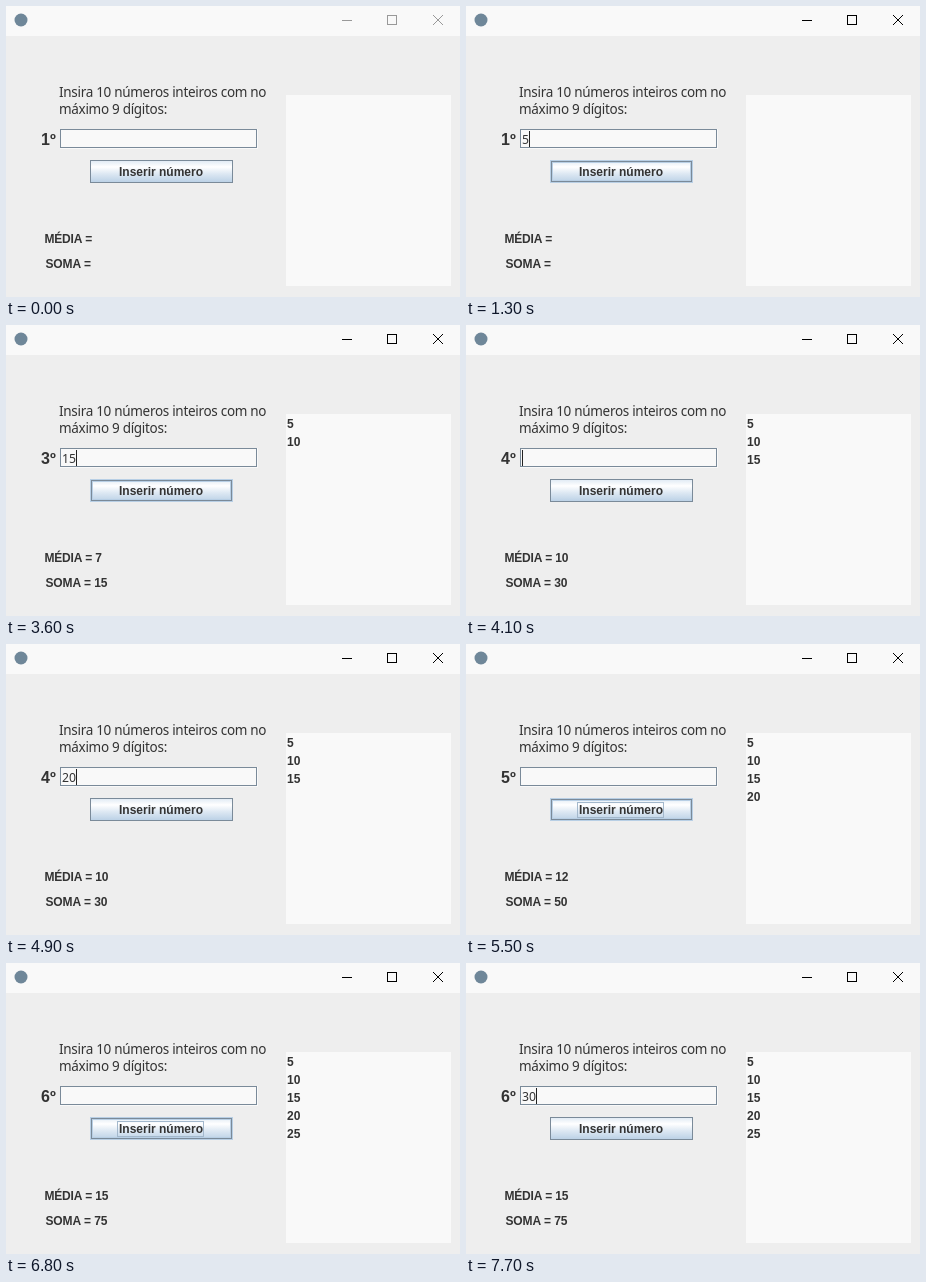
An HTML page with a canvas for the animation above (8 s loop, 454 by 291 pixels).

```html
<!DOCTYPE html>
<html lang="pt">
<head>
<meta charset="utf-8">
<title>Inserir números</title>
<style>
  html, body { margin: 0; width: 454px; height: 291px; overflow: hidden; }
  canvas { display: block; }
</style>
</head>
<body>
<canvas id="stage" width="454" height="291"></canvas>
<script>
const ctx = document.getElementById('stage').getContext('2d');
const LOOP = 8000;
const PAPER = '#f9f9f9', EDGE = '#7a8a99', BLUE = '#b8cfe5', INK = '#333';
const BOLD = 'bold 12px "Liberation Sans", Arial, sans-serif';

const ACTIONS = {
  activate: s => { s.active = s.caret = true; },
  type: (s, key) => { s.text += key; s.caret = true; },
  blink: s => { s.caret = false; },
  hover: s => { s.hover = true; },
  leave: s => { s.hover = false; },
  press: s => { s.pressed = s.buttonFocus = true; s.caret = false; },
  release: s => { s.pressed = false; s.values.push(+s.text); s.text = ''; },
  refocus: s => { s.buttonFocus = false; s.caret = true; },
};

const TIMELINE = [
  [600, 'activate'], [1000, 'blink'], [1200, 'type', '5'], [1300, 'hover'],
  [1500, 'press'], [1600, 'release'], [1600, 'leave'], [1900, 'refocus'],
  [2100, 'type', '1'], [2500, 'blink'], [2600, 'type', '0'], [2700, 'hover'],
  [2900, 'press'], [3000, 'release'], [3100, 'leave'], [3200, 'refocus'],
  [3300, 'type', '1'], [3500, 'type', '5'], [3600, 'hover'],
  [3700, 'press'], [3800, 'release'], [3900, 'leave'], [4100, 'refocus'],
  [4200, 'type', '2'], [4500, 'hover'], [4700, 'blink'], [4800, 'type', '0'],
  [4900, 'leave'], [5200, 'hover'], [5200, 'blink'],
  [5400, 'press'], [5500, 'release'], [5600, 'leave'], [6100, 'refocus'],
  [6300, 'type', '2'], [6500, 'type', '5'], [6600, 'hover'],
  [6700, 'press'], [6800, 'release'], [6900, 'leave'], [7100, 'refocus'],
  [7300, 'type', '3'], [7700, 'type', '0'],
];

function stateAt(time) {
  const state = { text: '', values: [] };
  for (const [start, action, key] of TIMELINE) {
    if (start <= time) ACTIONS[action](state, key);
  }
  return state;
}

function fill(color, x, y, w, h) {
  ctx.fillStyle = color;
  ctx.fillRect(x, y, w, h);
}

function outline(color, x, y, w, h) {
  ctx.strokeStyle = color;
  ctx.strokeRect(x + 0.5, y + 0.5, w - 1, h - 1);
}

function write(text, x, y, font = BOLD, spacing = 0) {
  ctx.font = font;
  ctx.letterSpacing = spacing + 'px';
  ctx.fillStyle = INK;
  ctx.fillText(text, x, y);
}

function drawTitleBar(active) {
  fill(PAPER, 0, 0, 454, 30);
  ctx.fillStyle = '#6f8799';
  ctx.beginPath();
  ctx.arc(15, 14, 6.5, 0, Math.PI * 2);
  ctx.fill();

  const color = active ? '#000' : '#999';
  fill(color, 336, 14, 10, 1);
  outline(color, 381, 9, 10, 10);
  ctx.beginPath();
  ctx.moveTo(427, 9);
  ctx.lineTo(437, 19);
  ctx.moveTo(437, 9);
  ctx.lineTo(427, 19);
  ctx.stroke();
}

function drawField({ text, caret }) {
  fill(PAPER, 54, 123, 198, 20);
  outline(EDGE, 54, 123, 197, 19);
  write(text, 56, 138, '12.25px "Noto Sans", sans-serif');
  if (caret) fill('#222', 56 + 7 * text.length, 125, 1, 16);
}

function drawButton({ hover, pressed, buttonFocus }) {
  const x = 84, y = 154, w = 143, h = 23;
  const shine = ctx.createLinearGradient(0, y, 0, y + h);
  [[0, '#dde8f3'], [0.3, '#fff'], [0.6, '#dde8f3'], [1, BLUE]]
    .forEach(([at, color]) => shine.addColorStop(at, color));
  fill(pressed ? BLUE : shine, x, y, w, h);
  if (pressed) {
    outline(EDGE, x, y, w, h);
    fill(EDGE, x, y, w, 2);
    fill(EDGE, x, y, 2, h);
  } else if (hover) {
    outline(BLUE, x, y, w, h);
    outline(BLUE, x + 2, y + 2, w - 4, h - 4);
    outline(EDGE, x + 1, y + 1, w - 2, h - 2);
  } else {
    outline(EDGE, x, y, w, h);
  }
  if (buttonFocus) outline('#a3b8cc', 111, 158, 87, 16);
  write('Inserir número', 113, 170);
}

function drawResults(values) {
  const count = values.length;
  const sum = values.reduce((a, b) => a + b, 0);
  const show = value => count ? value : '';
  write(`MÉDIA = ${show(Math.floor(sum / count))}`, 38.5, 237, BOLD, -0.2);
  write(`SOMA = ${show(sum)}`, 39.5, 262, BOLD, -0.15);
  fill(PAPER, 280, 89, 165, 191);
  values.forEach((value, i) => write(value, 281, 103 + 18 * i));
}

function draw(now) {
  const state = stateAt(now % LOOP);
  const prompt = '13.5px "Noto Sans", sans-serif';
  fill('#eee', 0, 0, 454, 291);
  drawTitleBar(state.active);
  write('Insira 10 números inteiros com no', 53, 91, prompt, -0.3);
  write('máximo 9 dígitos:', 53, 108, prompt, -0.3);
  write(`${state.values.length + 1}º`, 35, 139, 'bold 16px "Liberation Sans", Arial, sans-serif');
  drawField(state);
  drawButton(state);
  drawResults(state.values);
  requestAnimationFrame(draw);
}

requestAnimationFrame(draw);
</script>
</body>
</html>
```
